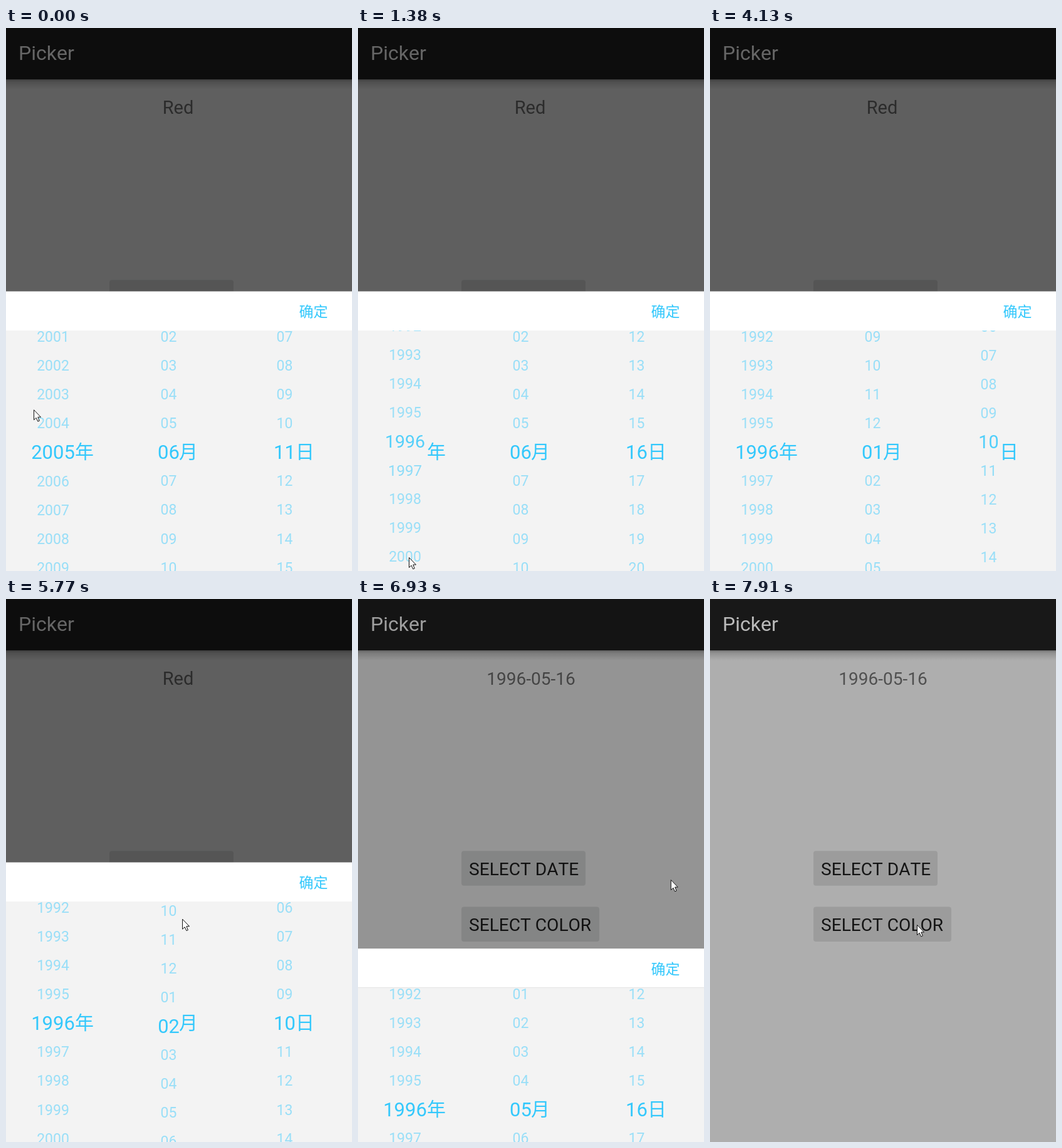
These frames come from a looping animation (552 px wide and 867 px high, 8000 ms). An HTML page with a canvas:

```html
<!DOCTYPE html>
<html lang="en">
<head>
<meta charset="utf-8">
<title>Picker</title>
<style>
html, body { margin: 0; width: 100%; height: 100%; overflow: hidden; background: #eee; }
canvas { display: block; width: 552px; height: 867px; }
</style>
</head>
<body>
<canvas id="stage" width="552" height="867"></canvas>
<script>
const W = 552, H = 867, LOOP = 8000;
const ctx = document.getElementById('stage').getContext('2d');
const LATIN = 'Roboto, sans-serif';
const CJK = '"Noto Sans CJK SC", "Noto Sans CJK", sans-serif';
const BLUE = '51, 200, 252';
const ROW = 46.1, MID = 677, PANEL_TOP = 420.5, BODY_TOP = 483;
const CLOSE = 6890, REOPEN = 7860, FADE = 113, SLIDE = 133, SETTLE = 140;
const MIDDLE_DAY = 16;

// Pointer path; a leg that names a wheel drags it, and fling adds rows on release
const legs = [
  { from: 0, to: 720, x: 62, y: 800, wheel: 'year' },
  { from: 720, to: 1100, x: 70, y: 632 },
  { from: 1100, to: 1380, x: 81, y: 845, wheel: 'year' },
  { from: 1540, to: 2230, x: 290, y: 643 },
  { from: 2530, to: 2831, x: 256.5, y: 866, wheel: 'month' },
  { from: 2950, to: 3400, x: 496, y: 650 },
  { from: 3400, to: 3560, x: 448, y: 622 },
  { from: 3560, to: 4130, x: 440, y: 882, wheel: 'day' },
  { from: 4500, to: 5350, x: 237, y: 672 },
  { from: 5350, to: 5630, x: 270, y: 552 },
  { from: 5630, to: 5961, x: 296, y: 455, wheel: 'month', fling: 2 },
  { from: 5961, to: 6630, x: 499, y: 448 },
  { from: 6930, to: 7770, x: 330, y: 520 },
];

const ramp = (ms, from, length) => Math.min(1, Math.max(0, (ms - from) / length));
const mix = (a, b, p) => a + (b - a) * p;

// Replays the gestures up to the given time
function stateAt(ms) {
  const s = { x: 44, y: 609, year: 2005, month: 6, day: 11 };
  for (const { from, to, x, y, wheel, fling = 0 } of legs) {
    if (ms < from) break;
    const p = ramp(ms, from, to - from);
    const endY = mix(s.y, y, p);
    if (wheel) {
      const value = s[wheel] - (endY - s.y) / ROW;
      const rest = Math.round(value + fling);
      const settled = ramp(ms, to, SETTLE * (1 + fling));
      s[wheel] = mix(value, rest, 1 - (1 - settled) ** 2);
      // A new year or month rebuilds the day list and centres it
      if (settled === 1 && wheel !== 'day') s.day = MIDDLE_DAY;
    }
    s.x = mix(s.x, x, p);
    s.y = endY;
  }
  return s;
}

function label(text, x, y, size, color, align = 'left', font = LATIN) {
  ctx.font = size + 'px ' + font;
  ctx.fontKerning = 'none';
  ctx.textAlign = align;
  ctx.fillStyle = color;
  ctx.fillText(text, x, y);
}

function box(color, y, h) {
  ctx.fillStyle = color;
  ctx.fillRect(0, y, W, h);
}

function button(text, y, w) {
  ctx.fillStyle = '#d5d6d6';
  ctx.beginPath();
  ctx.roundRect(165, y, w, 55.5, 4);
  ctx.fill();
  label(text, 177, y + 38.7, 28.1, '#1c1c1c');
}

function drawScreen(ms) {
  box('#eee', 0, H);
  box('#212121', 0, 82);
  const shade = ctx.createLinearGradient(0, 82, 0, 98);
  shade.addColorStop(0, 'rgba(0,0,0,.34)');
  shade.addColorStop(0.25, 'rgba(0,0,0,.17)');
  shade.addColorStop(1, 'rgba(0,0,0,0)');
  box(shade, 82, 16);
  label('Picker', 20, 51, 32, '#fff');
  if (ms < CLOSE) label('Red', 274.5, 136.5, 29, '#6d6d6d', 'center');
  else label('1996-05-16', W / 2, 136.5, 28, '#6d6d6d', 'center');
  button('SELECT DATE', 402.3, 198);
  button('SELECT COLOR', 491.5, 220);
  const dim = 0.6 * (1 - ramp(ms, CLOSE, FADE) + ramp(ms, REOPEN, FADE));
  box(`rgba(0,0,0,${dim})`, 0, H);
}

function wheel(x, value, wrap, unit, unitX) {
  const base = Math.round(value);
  for (let n = base - 5; n <= base + 5; n++) {
    const off = (n - value) * ROW;
    const focus = Math.max(0, 1 - (off / 31) ** 2);
    const size = 23 + 8 * focus;
    const num = wrap ? (n - 1 + wrap) % wrap + 1 : n;
    label(String(num).padStart(2, '0'), x, MID + off + size * 0.36, size,
      `rgba(${BLUE}, ${0.47 + 0.53 * focus})`, 'center');
  }
  label(unit, unitX, 687, 30, `rgb(${BLUE})`, 'center', CJK);
}

function drawPanel(ms, s) {
  ctx.save();
  ctx.translate(0, (H - PANEL_TOP) * ramp(ms, CLOSE, SLIDE));
  box('#fff', PANEL_TOP, BODY_TOP - PANEL_TOP);
  label('确定', 490.5, 461, 23, `rgb(${BLUE})`, 'center', CJK);
  box('#f3f3f3', BODY_TOP, H - BODY_TOP);
  ctx.beginPath();
  ctx.rect(0, BODY_TOP, W, H - BODY_TOP);
  ctx.clip();
  wheel(75, s.year, 0, '年', 125);
  wheel(259.5, s.month, 12, '月', 291);
  wheel(444.5, s.day, 31, '日', 477);
  ctx.restore();
}

const arrow = new Path2D('M0 0V16L3.6 12.6 6.3 18.4 8.8 17.4 6.3 11.5H11Z');

function drawPointer({ x, y }) {
  ctx.save();
  ctx.translate(x + 0.5, y + 0.5);
  ctx.fillStyle = '#fff';
  ctx.fill(arrow);
  ctx.strokeStyle = '#111';
  ctx.stroke(arrow);
  ctx.restore();
}

const start = performance.now();
function frame() {
  const ms = Math.max(0, performance.now() - start) % LOOP;
  const s = stateAt(ms);
  drawScreen(ms);
  drawPanel(ms, s);
  drawPointer(s);
  requestAnimationFrame(frame);
}
frame();
</script>
</body>
</html>
```
